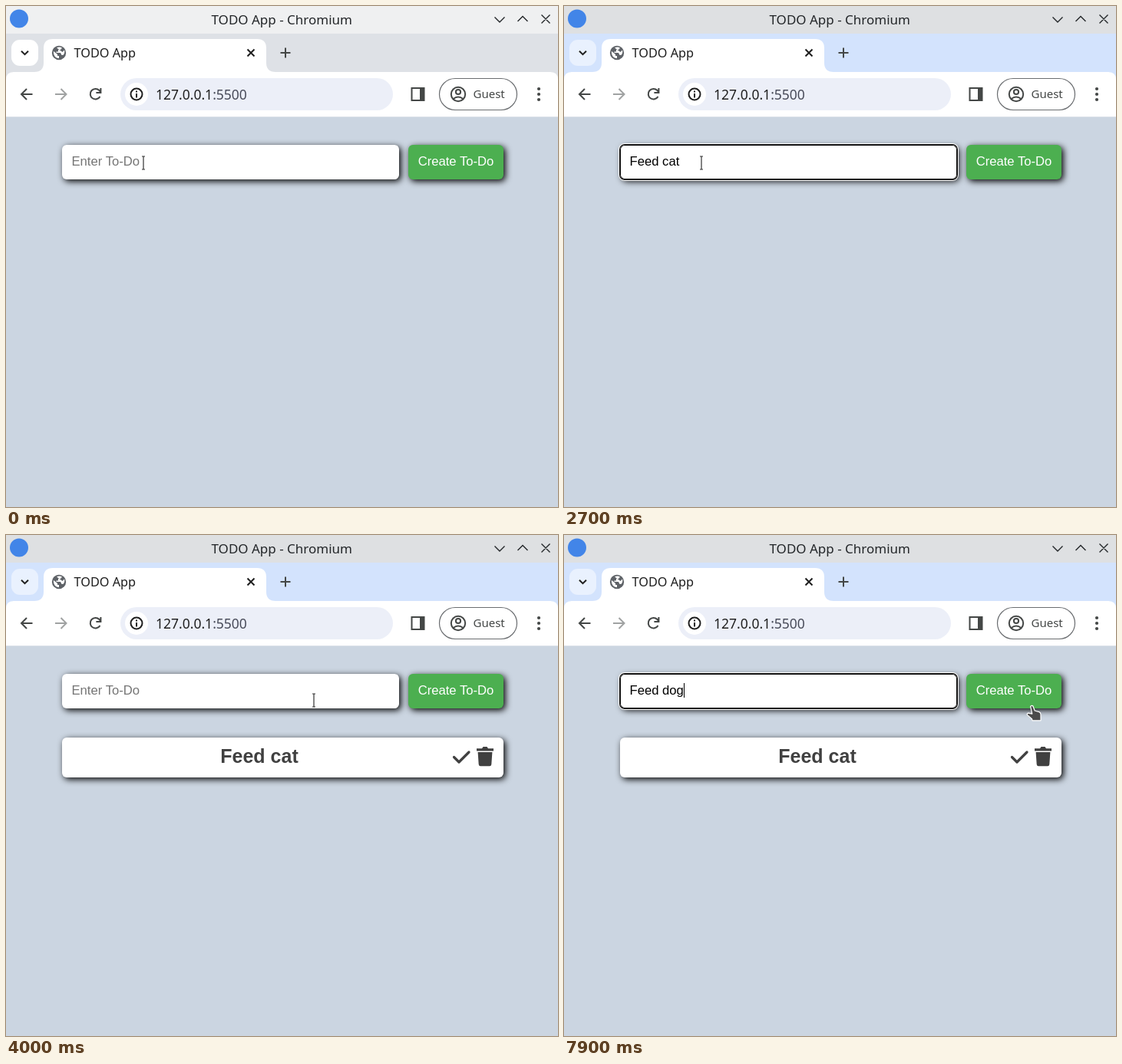
An HTML page that plays this animation: 719 px wide and 653 px high, repeating every 8 s.

```html
<!DOCTYPE html>
<html lang="en">
<head>
<meta charset="utf-8">
<title>TODO App</title>
<style>
  html, body { margin: 0; width: 100%; height: 100%; overflow: hidden; background: #cbd5e1; }
  body > *, .box, .box svg { position: absolute; }
  body > svg { left: 0; top: 0; }
  #chrome { font-family: "Noto Sans", sans-serif; --strip: #dee1e6; --bar: #eff0f1; --tabs: #fff; }
  #chrome.active { --strip: #d3e3fd; --bar: #dee0e2; --tabs: #e9f1fe; }
  .box {
    --shadow: 2.5px 2.5px 8.75px #000;
    border-radius: 6px; background: #fff; box-shadow: var(--shadow);
    font: 16.67px/44px "Liberation Sans", Arial, sans-serif; white-space: pre;
  }
  #field { left: 73px; top: 181px; width: 426.5px; height: 45px; padding-left: 12.5px; color: #000; }
  #field.focus { box-shadow: inset 0 0 0 1px #101010, 0 0 0 1px #101010, 0 0 0 2px #fff, var(--shadow); }
  #caret { position: absolute; top: 12px; width: 1px; height: 19px; background: #000; }
  #hint { color: #757575; }
  #create { left: 524px; top: 181px; width: 124px; height: 45px; color: #fff; text-align: center; background: #4caf50; }
  #create.hover { background: #3e8e41; }
  #item { left: 73px; top: 264px; width: 575px; height: 52px; color: #404040; }
  #item b { display: block; width: 514px; text-align: center; font-size: 25px; line-height: 49px; }
  #item svg { left: 0; top: 0; }
</style>
</head>
<body>
<svg id="chrome" width="719" height="146" fill="none">
  <rect width="719" height="36" fill="var(--bar)"/>
  <rect y="36" width="719" height="60" fill="var(--strip)"/>
  <circle cx="17" cy="16.5" r="12" fill="#4285e8"/>
  <path d="M0 144V96Q0 86 10 86H37Q49 86 49 74V55Q49 43 61 43H327Q339 43 339 55V74Q339 86 351 86H709Q719 86 719 96V144Z" fill="#fff"/>
  <path d="M0 144.5H719" stroke="#dde3ea"/>
  <rect x="7" y="44" width="35" height="34" rx="11" fill="var(--tabs)"/>
  <rect x="149" y="94" width="355" height="42" rx="21" fill="#eceff8"/>
  <circle cx="170" cy="115" r="15" fill="#fff"/>

  <g stroke="#232629" stroke-width="1.4">
    <path d="M636.5 14.5L643 21 649.5 14.5M666.5 20L673 13.5 679.5 20M697.5 11.5L708.5 22.5M708.5 11.5L697.5 22.5"/>
  </g>
  <g stroke="#1f1f1f" stroke-width="2">
    <path d="M20 58.7L24.5 63.2 29 58.7M314.5 56.5L323.5 65.5M323.5 56.5L314.5 65.5"/>
    <circle cx="170" cy="115" r="7.5"/>
    <path d="M170 114V119.5M170 110.5V112.5"/>
  </g>
  <g stroke="#444746" stroke-width="2">
    <path d="M364 54.5V67.5M357.5 61H370.5M34.5 115H20.5M27 108L20 115 27 122"/>
    <path d="M64 115H78M71.5 108L78.5 115 71.5 122" stroke="#a0a2a2"/>
    <path d="M122.5 118A6.8 6.8 0 1 1 121.5 110L123 112M123.4 107V113H117.4"/>
    <rect x="528.5" y="107" width="16" height="16"/>
    <path d="M539 107H545V123H539Z" fill="#444746" stroke="none"/>
    <rect x="564.5" y="94.5" width="101" height="41" rx="20.5" stroke="#6a6d70" stroke-width="1.2"/>
    <circle cx="589" cy="115" r="9.2"/>
    <circle cx="589" cy="112" r="3.1"/>
    <path d="M582.5 121.3Q589 115.8 595.5 121.3"/>
  </g>
  <g fill="#444746">
    <circle cx="694" cy="108" r="2.1"/><circle cx="694" cy="115" r="2.1"/><circle cx="694" cy="122" r="2.1"/>
  </g>
  <circle cx="69" cy="61" r="9.2" fill="#5f6368"/>
  <path d="M62 59L67 63V65H69V68.2Q62 67.5 61.8 60ZM66 54.5Q70 52.5 73 54.8L71 57H68V59.5H65.5V61H71L72.5 64H74.5Q77 61 76 57.5L73.5 60 71.5 58.5" fill="#fff"/>

  <g fill="#1f1f1f">
    <text x="267.5" y="24" font-size="17" fill="#232629">TODO App - Chromium</text>
    <text x="88.5" y="67" font-size="16.25">TODO App</text>
    <text x="195" y="122" font-size="17.5">127.0.0.1<tspan fill="#474a58">:5500</tspan></text>
    <text x="608.5" y="120" font-size="15" fill="#444746">Guest</text>
  </g>
</svg>

<div id="field" class="box"><span id="typed"></span><i id="caret"></i><span id="hint">Enter To-Do</span></div>
<div id="create" class="box">Create To-Do</div>
<div id="item" class="box"><b>Feed cat</b>
  <svg width="575" height="52">
    <path d="M510.5 25.5L517 32 530 19" fill="none" stroke="#404040" stroke-width="3.2" stroke-linecap="round" stroke-linejoin="round"/>
    <path d="M540 14.2H547L548.5 12H553.5L555 14.2H562V17.4H540ZM541.6 19H560.4L559.3 35Q559 37.3 557 37.3H545Q543 37.3 542.7 35Z" fill="#404040"/>
  </svg>
</div>

<svg id="pointer" width="719" height="653" stroke-linejoin="round">
  <g id="beam" fill="none">
    <path d="M-2-8.5H2M0-8.5V8.5M-2 8.5H2" stroke="#fff" stroke-width="2.6"/>
    <path d="M-2-8.5H2M0-8.5V8.5M-2 8.5H2" stroke="#333" stroke-width="1.2"/>
  </g>
  <path id="hand" d="M-2.4 1.4Q-.8-.6.9 1L3.2 7 9 8.6Q11 9.4 11 12V19.8H0L-.5 17.6-6.4 12.6Q-7.4 10.6-5.4 10.2L-.2 11.2Z" fill="#4b4b4b" stroke="#fff" stroke-width="1.2"/>
  <path id="arrow" d="M0 0V16.5L4.4 12.6H11.2Z" fill="#4b4b4b" stroke="#fff" stroke-width="1.2"/>
</svg>

<script>
  const LOOP = 8000, BLINK = 600;
  const $ = id => document.getElementById(id);

  // time, typed text
  const typing = [
    [0, ""], [100, ""], [1100, "F"], [1200, "Fe"], [1300, "Fee"], [1400, "Feed"], [1600, "Feed "],
    [1800, "Feed c"], [1900, "Feed ca"], [2100, "Feed cat"], [3300, ""], [4200, ""],
    [5100, "F"], [5300, "Fe"], [5400, "Fee"], [5700, "Feed"], [5800, "Feed "],
    [6000, "Feed d"], [6600, "Feed do"], [6700, "Feed dog"]
  ];

  // time, x, y, cursor
  const moves = [
    [0, 179, 204.5, "beam"], [2800, 205, 207, "beam"], [2900, 300, 212, "beam"], [3000, 430, 216, "beam"],
    [3100, 556, 217, "hand"], [3200, 574, 215, "hand"], [3900, 460, 218, "beam"], [4000, 401, 215.5, "beam"],
    [4100, 400, 214.5, "beam"], [7300, 400, 213.5, "beam"], [7500, 430, 217, "beam"], [7600, 520, 238, "arrow"],
    [7700, 615, 256, "arrow"], [7800, 668, 258, "arrow"], [7900, 610, 222, "hand"]
  ];

  const latest = (steps, t) => steps.findLast(step => step[0] <= t);
  const within = (t, from, to) => t >= from && t < to;

  function draw(t) {
    const [since, text] = latest(typing, t);
    const focus = within(t, 100, 3200) || t >= 4200;
    const caretOn = focus && Math.floor((t - since) / BLINK) % 2 === 0;

    $("chrome").classList.toggle("active", t >= 100);
    $("field").classList.toggle("focus", focus);
    $("create").classList.toggle("hover", within(t, 3100, 3900));
    $("typed").textContent = text;
    $("hint").hidden = text !== "";
    $("caret").style.visibility = caretOn ? "visible" : "hidden";
    $("item").style.visibility = t >= 3300 ? "visible" : "hidden";

    const [, x, y, cursor] = latest(moves, t);
    for (const shape of $("pointer").children) {
      shape.style.display = shape.id === cursor ? "" : "none";
      shape.setAttribute("transform", `translate(${x} ${y})`);
    }
  }

  const start = performance.now();
  function tick() {
    draw((performance.now() - start) % LOOP);
    requestAnimationFrame(tick);
  }
  tick();
</script>
</body>
</html>
```
